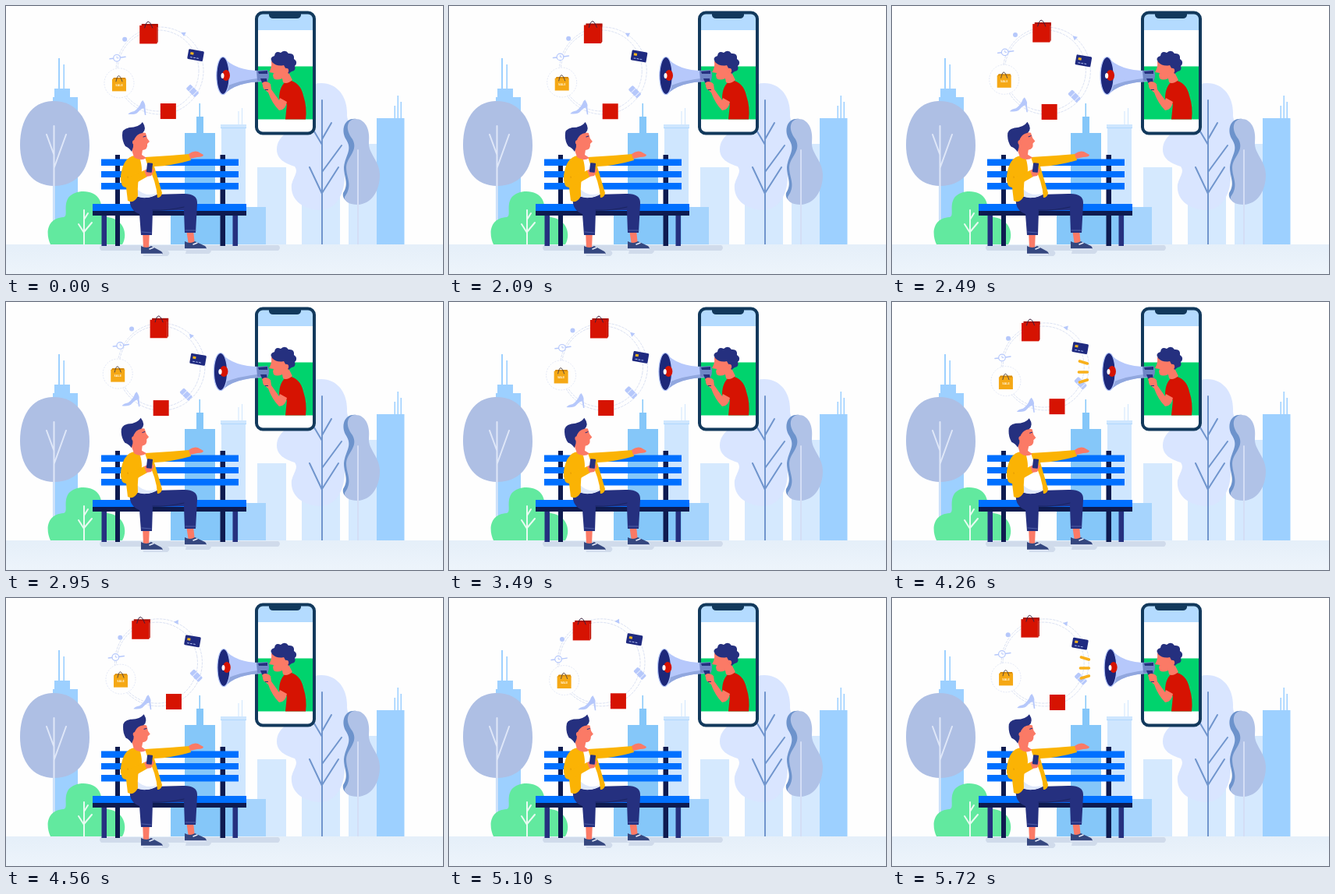
An HTML page that plays this animation: 560 px wide and 344 px high, repeating every 5800 ms.

```html
<!DOCTYPE html>
<html lang="en">
<head>
<meta charset="utf-8">
<title>Shout</title>
<style>
html, body { margin: 0; width: 100%; height: 100%; overflow: hidden; background: #fefefe; }
svg { display: block; width: 560px; height: 344px; }
.line { fill: none; stroke-linecap: round; stroke-linejoin: round; }
.navy { fill: #25307f; }
.skin { fill: #fb7a66; }
.pale { fill: #b6c8fb; }
</style>
</head>
<body>
<svg viewBox="0 0 560 344">
  <defs>
    <linearGradient id="ground" x2="0" y2="1">
      <stop stop-color="#e5eff9"/><stop offset="1" stop-color="#edf4fb"/>
    </linearGradient>
  </defs>

  <!-- skyline -->
  <path fill="#9dd0ff" d="M60 306V117H62V106H67V67H69V106H73.400V75H75V106H82V117H92V306Z"/>
  <path fill="#cfe6fe" d="M276 306V157H275V152H297.500V135H298.500V152H302V131H303V152H308V157H307V306Z"/>
  <path fill="none" stroke="#b0d7fd" d="M275 156.500H308"/>
  <path fill="#d5e9fe" d="M322 306V207H359V306ZM379 306V175H428V306ZM439 306V177H476V306Z"/>
  <path fill="#a6d4fd" d="M298 258H333V306H298Z"/>
  <path fill="#85c7f9" d="M211 306V263H229V163H244V142H247.500V125H249V142H253V163H268V263H298V306Z"/>
  <path fill="#9dd0ff" d="M475 306V144H497.500V128H499V144H501.500V115H503V144H505.500V123H507V144H510.500V306Z"/>

  <!-- trees -->
  <path fill="#aebfe4" d="M59 122C89 121 107 144 107 179C107 212 89 231 62 231C34 231 18 210 18 178C18 147 32 123 59 122Z"/>
  <path class="line" stroke="#dfe7f8" stroke-width="2" d="M61.500 154V306M61.500 208L77 165M61.500 191L52 165"/>
  <path fill="#d9e5ff" d="M404 99C425 99 438 117 437 140C437 150 447 156 446 175C445 195 434 198 434 218C434 245 420 263 401 262C381 261 364 249 366 229C369 218 375 213 370 206C358 202 347 197 347 184C347 166 365 163 369 147C374 127 377 99 404 99Z"/>
  <path class="line" stroke="#7095cd" stroke-width="2" d="M405 121V306M405 178L389 151M405 171L417 150M405 241L389 207M405 213L430 179M405 240L426 207"/>
  <path fill="#6d93cc" d="M449 145C434 143 429 158 435 170C445 185 435 190 433 207C433 220 440 228 432 240C430 251 443 253 452 254Z"/>
  <path fill="#b0c2e7" d="M447 145C460 144 467 158 465 175C464 190 480 199 479 219C478 240 467 254 451 255C440 255 433 251 434 245C445 230 436 221 436 207C437 193 452 186 444 171C434 158 437 146 447 145Z"/>
  <path class="line" stroke="#d4def5" stroke-width="2" d="M451 185V306"/>
  <path fill="url(#ground)" d="M0 306H560V344H0Z"/>
  <path fill="#62e99f" d="M57 306C50 291 53 272 74 271C80 269 73 257 80 246C90 234 114 236 120 249C125 260 121 269 130 271C150 273 157 292 149 306Z"/>
  <path class="line" stroke="#e8fbf1" stroke-width="2" d="M100 262V306M100 291L93 280M100 290L110 278M100 274L105 266"/>

  <!-- bench -->
  <path fill="#d0dbeb" d="M122 307H349Q353 310 349 314H122Q118 310 122 307ZM174 314H207Q212 317 207 321H176ZM232 309H261Q266 314 260 318H230Z"/>
  <path fill="#0e1b50" d="M140 191H146V264H140ZM274.500 191H281V264H274.500Z"/>
  <path fill="#0070ff" d="M122 196.500H298V205H122ZM122 212H298V220H122ZM122 227H298V235.500H122ZM111 254H308V263H111Z"/>
  <path fill="#25307f" d="M122.500 269H129V308H122.500ZM290.500 269H297V308H290.500Z"/>
  <path fill="#0e1b50" d="M111 263H308V269H111ZM140 269H146V308H140ZM274.500 269H281V308H274.500Z"/>

  <!-- man -->
  <path class="skin" d="M175 288H184L183 311H176ZM231 287H240L242 307H234Z"/>
  <path fill="#35477f" d="M173 308Q180 312 186 308L199 315Q202 318 200 319H173ZM229 302Q236 306 242 302L255 308Q258 311 256 312H229Z"/>
  <path class="line" stroke="#e8eefc" stroke-width="1.500" d="M173 318.500H200M229 312H256M184 312L189 310M240 306L245 304"/>
  <path class="navy" d="M159 246L190 242L226 241Q246 240 245 254L243 291H229L228 262L188 263L187 294H173L171 267Q157 262 159 246Z"/>
  <path class="line" stroke="#1a2460" d="M188 262Q207 263 228 258"/>
  <path class="line" stroke="#5160a8" d="M174 290L186 291M230 288L243 288"/>
  <path fill="#fff" d="M165 195L184 194Q195 222 195 241Q181 250 167 243Z"/>
  <path fill="#dfe8fa" d="M168 235Q179 246 195 240Q181 250 167 244Z"/>
  <path fill="#fbb304" d="M165 192Q150 194 147 218Q146 231 154 233L156 250Q164 254 169 244Q168 224 172 217Q176 213 172 197Z"/>
  <path fill="#fbb304" d="M178 194L210 192L235 190L237 198Q213 205 190 206L200 240Q199 246 194 246Q193 226 181 203Z"/>
  <path class="line" stroke="#df9605" d="M158 230L172 222M158 230L156 219"/>
  <path fill="#fbb304" d="M148 226Q148 235 158 232L181 219L177 211L159 219Z"/>
  <path class="skin" d="M177 211L186 207L190 211L186 218L180 219Z"/>
  <rect class="navy" x="180.500" y="201.500" width="7" height="12" rx="1" transform="rotate(7 184 207)"/>
  <path class="skin" d="M234 190Q240 185 246 187L253 191Q253 194 245 194L236 196Z"/>
  <g id="head">
    <path class="skin" d="M159 178L164 167Q171 161 179 163L181 170L184 174L181 177Q182 184 175 185L174 191L180 195Q172 200 164 194Z"/>
    <path class="navy" d="M149 166Q148 158 158 156Q170 156 175 149Q181 158 175 163Q168 164 165 170Q163 174 163 181L161 187Q158 182 153 180Q149 174 149 166Z"/>
    <circle class="skin" cx="165" cy="175" r="3"/>
    <path class="line" stroke="#25307f" d="M176 168L179 167"/>
  </g>

  <!-- phone and caller -->
  <rect x="321" y="8.500" width="74" height="155" rx="8" fill="#fff"/>
  <path fill="#b4dbff" d="M321 31V16Q321 9 328 9H387Q394 9 394 16V31Z"/>
  <path fill="#00d36d" d="M322 77.500H393V145.500H322Z"/>
  <path fill="#d61302" d="M361 95Q377 97 381 115Q386 130 384 145.500H358L360 126L350 119Q350 102 361 95Z"/>
  <path class="skin" d="M340 71L356 72L362 85L367 95Q360 101 355 98L354 93Q347 96 343 93L342 89L343 86L337 85Q341 79 340 71Z"/>
  <path class="navy" d="M341 72Q337 66 344 64Q345 57 352 60Q358 55 362 61Q370 60 369 68Q375 72 370 77Q372 83 366 84L362 87L356 76Q347 78 341 72Z"/>
  <circle class="skin" cx="359" cy="83" r="3.200"/>
  <path class="skin" d="M351 118L360 123Q358 134 350 134Q341 125 336 111L330 106Q327 99 332 97L339 100L340 107L350 121Z"/>
  <rect x="321" y="8.500" width="74" height="155" rx="8" class="line" stroke="#12395c" stroke-width="4"/>
  <path fill="#12395c" d="M337 7H378V12Q377 16 373 16H342Q338 16 337 12Z"/>

  <!-- orbit -->
  <g id="ring" class="line" stroke="#d3dbf0" stroke-width=".8" stroke-dasharray="2.500 2">
    <circle cx="195" cy="83" r="52"/><circle cx="197" cy="83" r="56"/>
  </g>
  <g id="items">
    <g><circle class="pale" r="3"/></g>
    <g><path class="pale" d="M-3.500 -2.500L3 -3L.5 2.500Z"/></g>
    <g>
      <path class="line" stroke="#b6c8fb" stroke-width="1.500" d="M-9 1L-4 .5M4 -.5L11 -1.500"/>
      <circle r="4.300" fill="#fff" stroke="#b6c8fb" stroke-width="1.200"/>
      <path class="line" stroke="#b6c8fb" d="M0 -2V0H2"/>
    </g>
    <g>
      <circle r="19" fill="#fefefe" stroke="#dce3f4" stroke-width=".8" stroke-dasharray="2 1.500"/>
      <path fill="#d98c07" d="M-7 -7H8L9 -4H-9Z"/>
      <path fill="#f5a815" d="M-9 -5H9V10.500H-9Z"/>
      <path class="line" stroke="#5a4a42" d="M-4 -2Q-1 -17 4 -2"/>
      <text y="4" text-anchor="middle" font-family="Open Sans, sans-serif" font-size="4" font-weight="700" fill="#fff3d5">SALE</text>
    </g>
    <g><path class="pale" d="M7 -10Q11 -4 10 -1L11 9H9.500L8 0Q4 1 1 5Q-2 9 -12 8Q-10 5 -4 4Q2 0 5 -8Z"/></g>
    <g><rect x="-10" y="-10" width="20" height="20" fill="#d61302"/></g>
    <g>
      <g transform="rotate(45)">
        <rect class="pale" x="-8.500" y="-4" width="16" height="8" rx="1.500"/>
        <path stroke="#e7edff" d="M-3 -4V4M4 -4V4"/>
      </g>
    </g>
    <g>
      <g transform="rotate(10)">
        <rect x="-10" y="-6.500" width="20" height="13" rx="1.500" fill="#1f2a80"/>
        <rect x="-7" y="-3" width="4" height="3" fill="#f8b51b"/>
        <path class="line" stroke="#aab9ee" stroke-dasharray="2 2" d="M-6 3.500H6"/>
      </g>
    </g>
    <g>
      <path fill="#a90d02" d="M-9 -13H12V-9H-9Z"/>
      <path fill="#d61302" d="M-11.500 -11H10.500V12.500H-11.500Z"/>
      <path fill="#bd0e02" d="M10.500 -11L12 -13V10L10.500 12.500Z"/>
      <path class="line" stroke="#3a2140" d="M-5 -8Q-1 -24 5 -8"/>
    </g>
  </g>

  <!-- megaphone -->
  <path id="waves" class="line" stroke="#f8b01b" stroke-width="3.500" d="M-5 -14L5 -11M-6 0H5M-5 13L5 10"/>
  <g id="horn">
    <path fill="#b6c8fb" d="M278 65Q293 83 326 83L331 97Q295 97 279 114Z"/>
    <path fill="#91a7de" d="M280 104Q300 95 329 92L331 97Q295 97 279 114Z"/>
    <ellipse cx="278" cy="89.500" rx="8.200" ry="24" fill="#1d287a" stroke="#b6c8fb" stroke-width="1.200"/>
    <ellipse cx="282" cy="89" rx="5" ry="7" fill="#d61302"/>
    <ellipse cx="277.500" cy="89.500" rx="2" ry="3.500" fill="#fff"/>
  </g>
  <path fill="#6f86c6" d="M321 83L335 82Q339 89 335 97L322 96Z"/>
  <path fill="#25307f" d="M323 84L335 83V87H324ZM326 93H334L336 108H332Z"/>
  <path class="skin" d="M328 99Q332 95 338 99L339 107L331 107Z"/>
</svg>

<script>
const LOOP = 5800, REST = 2010, START = 2090, STEP = 77.15, SWING = 4000;
const $ = id => document.getElementById(id);

// resting x, y and swing in degrees, in drawing order
const orbit = [
  [152, 43, 12], [227.5, 36.5, 13], [142, 67, 12], [145, 99, 7.5], [168.5, 131, 10],
  [208, 135, 10], [239.5, 109, 15], [243, 63, 13], [182.5, 36, 16.5]
];
const items = [...$("items").children];

// time, x of the horn's mouth
const mouthKeys = [[0, 278], [START, 278], [2640, 275], [3300, 275], [3600, 278.5], [3950, 277],
  [4560, 279], [5100, 276], [5720, 280], [LOOP, 278]];
const bursts = [3770, 5280];

function mouthAt(t) {
  const i = mouthKeys.findIndex(k => k[0] > t);
  const [t0, x0] = mouthKeys[i - 1], [t1, x1] = mouthKeys[i];
  const p = (t - t0) / (t1 - t0);
  return x0 + (x1 - x0) * p * p * (3 - 2 * p);
}

function draw(now) {
  let t = now % LOOP;
  t = t < START ? REST : START + Math.floor((t - START) / STEP) * STEP;
  const s = Math.sin((t - 2000) / SWING * 2 * Math.PI);

  items.forEach((el, i) => {
    const [x, y, swing] = orbit[i], a = swing * s;
    el.setAttribute("transform", `rotate(${a} 197 82) translate(${x} ${y}) rotate(${i == 1 ? a : -a})`);
  });
  $("ring").setAttribute("transform", `translate(${2 * s} 0) rotate(${12 * s} 196 83)`);
  $("head").setAttribute("transform", `rotate(${-3 * s} 168 192)`);

  const stretch = (332 - mouthAt(t)) / 54;
  $("horn").setAttribute("transform", `translate(332 0) scale(${stretch} 1) translate(-332 0)`);

  const start = bursts.find(b => t >= b && t < b + 540);
  $("waves").style.display = start ? "" : "none";
  if (start) $("waves").setAttribute("transform", `translate(${267 - (t - start) * 0.045} 90)`);
}

(function loop() {
  draw(performance.now());
  requestAnimationFrame(loop);
})();
</script>
</body>
</html>
```
